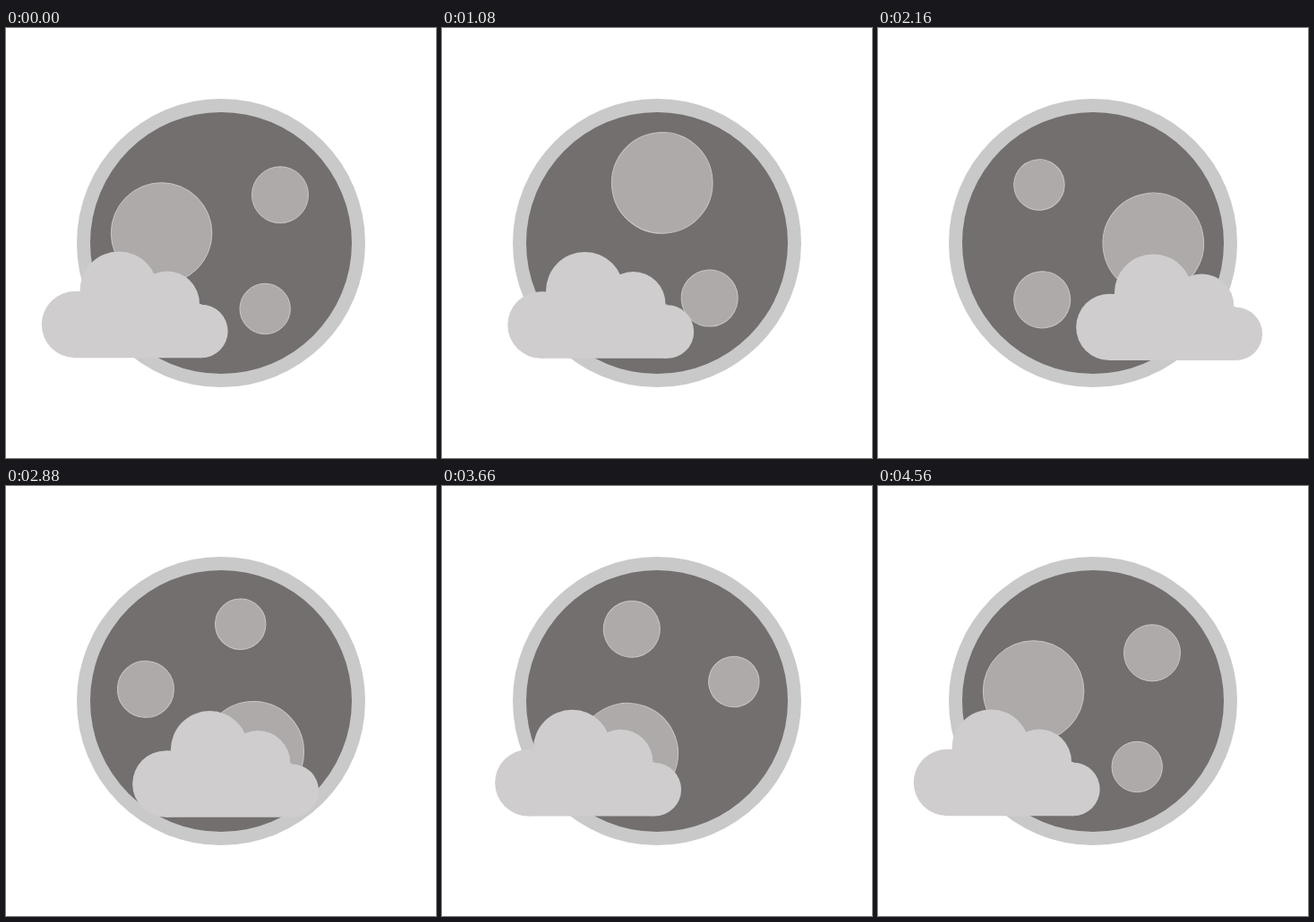
An HTML page for the animation above (4.62 s loop, 480x480 px).

```html
<!DOCTYPE html>
<html lang="en">
<head>
<meta charset="utf-8">
<title>Moon and cloud</title>
<style>
  html, body { margin: 0; height: 100%; overflow: hidden; background: #fff; }
  svg { display: block; width: 100vw; height: 100vh; }
</style>
</head>
<body>
<svg viewBox="0 0 480 480">
  <circle cx="240" cy="240" r="161" fill="#c9c9c9"/>
  <circle cx="240" cy="240" r="146" fill="#726f6e"/>
  <g id="craters" fill="#adaaa9" stroke="#c9c6c6">
    <circle cx="173.6" cy="229" r="56.3"/>
    <circle cx="306" cy="186.3" r="31.5"/>
    <circle cx="289.2" cy="313.5" r="28.2"/>
  </g>
  <g id="cloud" fill="#cfcdcd">
    <circle cx="77" cy="331" r="37.2"/>
    <circle cx="126" cy="293" r="43.5"/>
    <circle cx="180" cy="307.5" r="36"/>
    <circle cx="218" cy="338.5" r="29.7"/>
    <path d="M77 294H180V308H218V368.2H77Z"/>
  </g>
</svg>
<script>
  const LOOP = 4620, STEP = 60, TURN = 4547, DRIFT = 202;
  const craters = document.getElementById('craters');
  const cloud = document.getElementById('cloud');

  // Cubic Bezier easing (.29, 0, .52, 0), solved by bisection; its y is s³.
  function ease(x) {
    let low = 0, high = 1;
    for (let i = 0; i < 24; i++) {
      const s = (low + high) / 2, r = 1 - s;
      if (3 * s * r * (r * .29 + s * .52) + s ** 3 < x) low = s;
      else high = s;
    }
    return low ** 3;
  }

  function draw(now) {
    const time = Math.floor(now % LOOP / STEP) * STEP;
    const turn = Math.min(1, time / TURN);
    const x = DRIFT * ease(1 - Math.abs(2 * turn - 1));
    craters.setAttribute('transform', `rotate(${360 * turn} 240 240)`);
    cloud.setAttribute('transform', `translate(${x} ${x * .016})`);
    requestAnimationFrame(draw);
  }
  draw(0);
</script>
</body>
</html>
```
